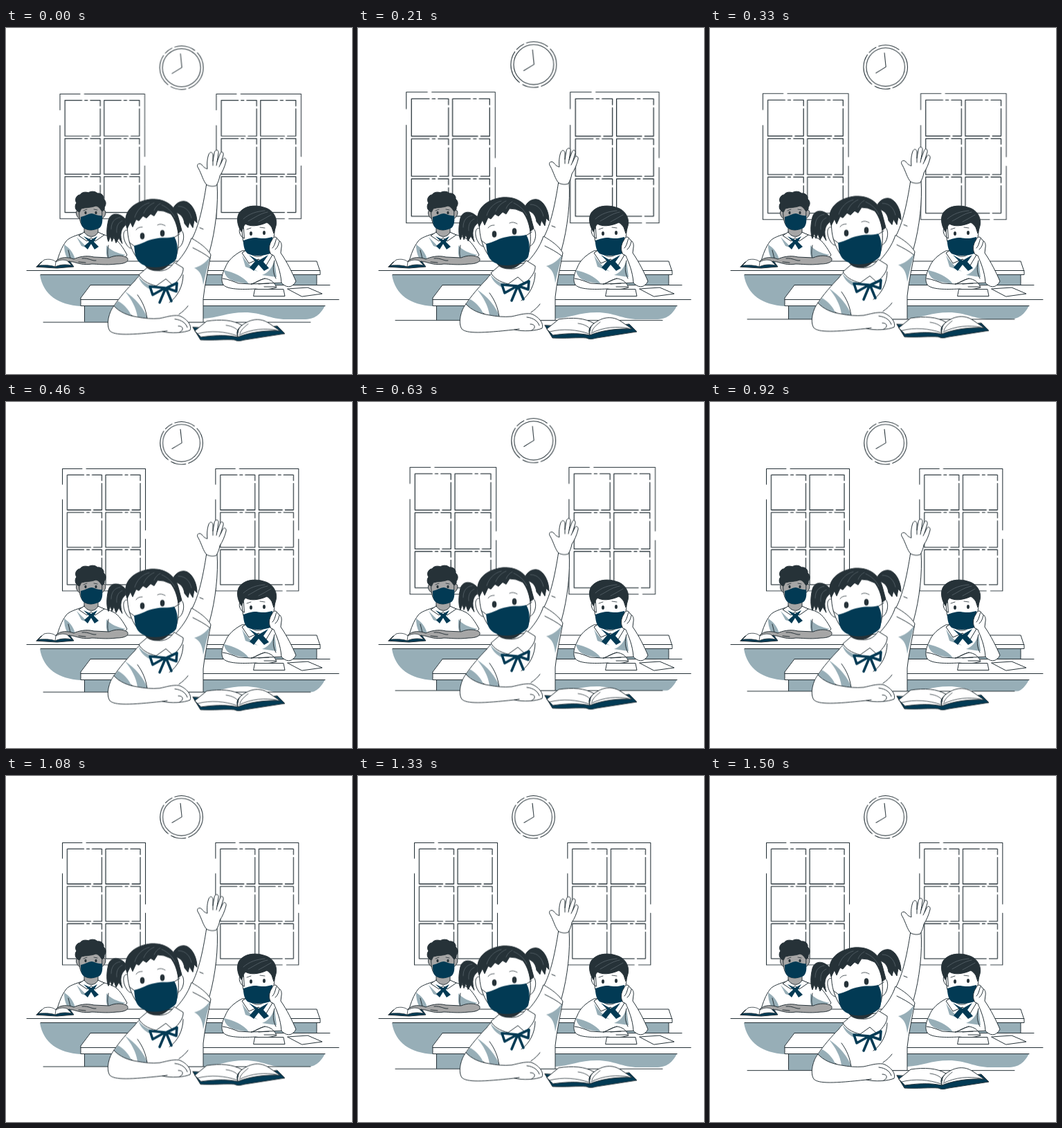
An HTML page for the animation above (1540 ms loop, 500 by 500 pixels).

```html
<!DOCTYPE html>
<html lang="en">
<head>
<meta charset="utf-8">
<title>Classroom</title>
<style>
  html, body { margin: 0; width: 100%; height: 100%; overflow: hidden; background: #fff; }
  svg { display: block; width: 100vw; height: 100vh; }
  .ink { fill: none; stroke: #263238; stroke-width: 1; stroke-linecap: round; stroke-linejoin: round; }
  .w { fill: #fff; }
  .hair { fill: #263238; }
  .navy { fill: #023a54; }
  .shade { fill: #97aeb7; stroke: none; }
  .skin { fill: #a6a6a6; }
  .flat { stroke: none; }
  .thin { stroke-width: .8; }
  .bold { stroke-width: 1.2; }
  .gloss { stroke: #76838a; stroke-width: .5; }
  .fold { stroke: #023a54; stroke-width: 3.6; }
  .room { transform-origin: 248px 150.5px; animation: beat 1540ms linear -31ms infinite; }
  .front { animation: float 1540ms linear -30ms infinite; }
  @keyframes beat {
    0%, 29.6%, 39.2%, 58.8%, 100% { transform: scale(1); }
    9.9%, 49% { transform: scale(1.1); }
  }
  @keyframes float {
    0%, 100% { transform: translateY(0); }
    50% { transform: translateY(-10px); }
  }
</style>
</head>
<body>
<svg viewBox="0 0 500 500" class="ink">
  <defs>
    <path id="pane" class="bold" d="M0 0H24M28 0H32M36 0H50V8M50 12V50.500H38M34 50.500H0V0"/>
    <g id="window">
      <path d="M81.500 119V96.500H110M116 96.500H201.500V185M201.500 198V273H184M178 273H81.500V141"/>
      <use href="#pane" x="88.500" y="105.500"/>
      <use href="#pane" x="144" y="105.500"/>
      <use href="#pane" x="88.500" y="159.500"/>
      <use href="#pane" x="144" y="159.500"/>
      <use href="#pane" x="88.500" y="213.500"/>
      <use href="#pane" x="144" y="213.500"/>
    </g>
  </defs>

  <g class="room">
    <use href="#window"/>
    <use href="#window" x="221.300"/>
    <circle cx="253.500" cy="59.300" r="27"/>
    <circle cx="253.500" cy="59.300" r="30.800" stroke-dasharray="38 4 22 5 46 4 12 4 30 5"/>
    <path d="M252 39.500L254 59L240 67.500"/>
  </g>

  <!-- back desk -->
  <g>
    <path class="w flat" d="M44 337H449L454 352V357H449V371H113V402H60V357L30 351Z"/>
    <path class="shade" d="M49 357H449V371H122L108 390V402C76 400 54 386 49 357Z"/>
    <path d="M150 337H449L454 352V356.500H50M30 350.500H454M449 357V371"/>
  </g>

  <!-- boy on the left -->
  <g>
    <path class="w" d="M113 296C100 300 91 303 87 308C80 317 77 327 74 336H168L175 328C169 317 163 308 156 304C149 300 140 299 133 296Z"/>
    <path class="shade" d="M84 313C91 317 98 325 100 335L88 332C85 326 84 320 84 313ZM145 314C150 321 162 326 173 328L149 334C144 331 145 324 145 314ZM102 302L118 318L109 315Z"/>
    <path d="M93 333L90 321M148 333C146 325 147 320 148 314"/>
    <path class="skin" d="M72 337C78 330 91 331 98 334C104 331 116 328 127 331L149 332C158 328 169 328 175 332C179 337 172 341 160 341C144 343 132 341 124 341C113 343 104 340 97 338Z"/>
    <path d="M110 333C120 332 124 337 130 336M105 338L115 339"/>
    <path class="skin" d="M113 288V297C118 304 127 304 133 297V286Z"/>
    <path class="w" d="M113 295L105 300L117 308L123 303L129 308L142 299L133 295C129 303 119 304 113 295Z"/>
    <path class="skin" d="M107 263C100 260 99 272 107 276ZM138 263C146 260 146 272 138 276Z"/>
    <path class="skin" d="M106 258C104 283 111 292 123 292C136 291 141 278 138 256Z"/>
    <path class="hair" d="M106 266C99 264 99 256 102 253C98 247 103 241 107 241C110 236 117 237 119 238C123 235 130 236 132 239C138 238 142 243 141 247C146 251 144 257 142 259C143 263 139 266 138 264C136 261 134 258 130 257C123 260 114 259 109 261Z"/>
    <path class="thin" d="M112 264L117 262M127 262L132 263"/>
    <g class="hair flat"><ellipse cx="115" cy="267" rx="1.600" ry="2.300"/><ellipse cx="130" cy="267" rx="1.600" ry="2.300"/></g>
    <path class="navy flat" d="M108 273C116 271 120 268 124 268C129 269 133 272 139 271C140 279 139 286 135 289C128 293 118 293 112 289C108 285 108 279 108 273Z"/>
    <path class="navy flat" d="M112 301L123 306L132 301L127 309L134 316L128 320L123 312L118 320L113 315L120 309Z"/>
    <path class="navy" d="M44 345L51 338L72 341L92 337L98 345L74 347Z"/>
    <path class="w thin" d="M47 343L55 335C63 333 69 335 72 338C79 334 84 335 88 336L95 343C85 341 78 342 71 345C62 342 55 343 47 343ZM72 338L71 345"/>
  </g>

  <!-- front desk -->
  <g>
    <path class="w flat" d="M122 371.500H468L481 392V401H108V390Z"/>
    <path class="shade" d="M113 401.500H461C454 414 447 421 430 421H405C382 421 370 411 345 411C320 411 305 419 285 420V427H113Z"/>
    <path d="M122 371.500H468M122 371.500L108 390V401.500H461M108 392.500H481M113.500 402V424"/>
  </g>

  <!-- boy on the right -->
  <g>
    <path class="w" d="M341 322C329 328 320 337 317 346C312 355 310 365 314 371C320 378 340 378 360 377C368 378 378 379 391 375C388 367 382 363 374 362C364 365 360 369 354 370L402 368C400 350 396 334 390 322Z"/>
    <path class="shade" d="M315 350C328 353 344 359 351 370L334 367C321 364 316 358 315 350ZM341 328C347 338 355 346 364 352L346 345ZM388 336C384 348 378 354 370 357L391 360Z"/>
    <path d="M313 362C322 363 330 367 336 369L354 370C360 369 365 364 374 362M388 336C385 346 386 354 390 362M365 370L380 369M373 374L390 374"/>
    <path class="w" d="M350 319V329C357 337 368 337 377 328V318Z"/>
    <path class="w" d="M349 320L341 325L351 340L365 334L376 343L385 328L377 321C372 333 356 334 349 320Z"/>
    <path class="w" d="M343 288C335 285 335 300 344 304ZM342 280C339 306 344 326 364 327C383 326 390 306 388 279Z"/>
    <path class="hair" d="M340 294C333 284 332 269 341 263C349 256 363 256 372 259C386 262 393 275 390 286L387 297L384 288C382 285 380 283 377 281C364 287 352 287 346 283C343 286 343 290 340 294Z"/>
    <path class="gloss" d="M343 276C352 268 362 265 374 264M350 279C360 274 367 268 378 266M365 280C373 276 379 272 383 270"/>
    <path class="thin" d="M348 291L354 289M367 288L374 289"/>
    <g class="hair flat"><ellipse cx="354" cy="297" rx="2" ry="3"/><ellipse cx="373" cy="296" rx="2" ry="3"/></g>
    <path class="navy flat" d="M343 307C350 305 354 303 362 303C371 305 377 304 385 302C387 310 386 320 382 326C370 330 357 330 349 326C344 321 343 314 343 307Z"/>
    <path class="w" d="M383 327C379 321 380 313 384 307C387 300 391 301 393 306C397 308 399 312 398 317L397 325C406 338 414 354 419 366C413 377 404 375 398 368C397 352 391 338 387 329Z"/>
    <path d="M385 318C389 314 389 308 391 304M389 320C393 317 394 312 395 308"/>
    <path class="navy flat" d="M351 328L365 336L379 328L372 338L380 347L373 351L365 342L358 351L352 346L360 337Z"/>
    <path class="w" d="M360 377.500H401L403 387.500H358ZM407 377L436 375L457 384L428 388Z"/>
  </g>

  <g class="front">
    <path class="w flat" d="M54 425.600H482V445H54Z"/>
    <path d="M54 425.600H440"/>

    <!-- raised arm -->
    <path class="w" d="M266 310C277 292 284 264 290 224L305 226C307 254 303 292 294 324Z"/>
    <path class="w" d="M290 227C285 222 283 212 278 203C274 198 279 194 283 198C286 202 288 203 291 204C290 196 291 188 293 183C295 178 299 180 299 184L299 193L301 181C302 175 308 176 307 181L305 194L309 183C311 177 315 180 314 184L310 197L313 191C315 186 319 189 318 193C316 201 313 208 309 214C308 220 306 224 304 228C299 230 294 229 290 227Z"/>
    <path d="M299 193L299 199M305 194L304 199M310 197L308 201M280 289L285 291"/>

    <!-- shirt -->
    <path class="w" d="M207 348C196 355 190 360 186 366C176 376 163 391 156 402L200 425.600H285V392C287 372 292 350 296 328C290 318 280 311 268 304C263 320 252 334 244 342Z"/>
    <path class="shade" d="M295 331C287 341 280 345 272 347C280 351 284 358 285 372C288 357 292 343 295 331ZM172 381C187 391 199 405 205 421L190 418C188 404 181 392 172 381ZM162 395C171 400 178 408 181 416C171 413 163 409 156 402ZM191 359C198 368 207 373 218 374L206 377C198 372 194 367 191 359Z"/>
    <path d="M190 386C198 397 202 407 204 420M256 357C256 373 248 389 236 397M270 318C278 322 288 327 295 333M250 414C255 411 260 406 263 402"/>
    <path class="w" d="M206 345L192 357C196 364 204 370 217 373L231 363L241 372C251 364 257 354 256 347L243 339C235 353 218 355 206 345Z"/>
    <path class="hair flat" d="M198 338C202 354 226 357 238 340Z"/>

    <!-- bow -->
    <path class="fold" d="M230 376L208 374L212 386ZM232 376L247 369L246 381ZM230 378L222 397M232 378L239 395"/>

    <!-- head -->
    <path class="hair" d="M173 277C166 268 152 265 148 278C145 290 145 302 148 309L151 301L153 309L156 302L159 311L163 304L168 312C164 299 166 291 172 286Z"/>
    <path class="hair" d="M242 260C247 251 256 249 262 252C271 257 276 270 276 282L272 278L270 289L265 281L263 289L258 283C257 274 252 268 245 267Z"/>
    <path class="gloss" d="M152 291C152 281 157 275 165 274M160 296C159 286 163 281 168 279M249 258C260 258 266 266 268 275"/>
    <path class="w" d="M177 293C168 289 168 304 174 313C177 318 181 320 184 318ZM248 293C257 288 259 304 254 313C251 318 248 319 245 318Z"/>
    <path class="w" d="M176 280C174 298 178 314 186 328C196 345 235 348 246 330C251 315 250 296 245 272L220 256Z"/>
    <path class="hair" d="M175 290C167 270 180 252 208 248C232 246 246 259 250 278L254 293L249 297C247 284 243 275 238 269L228 265L219 264L214 272L209 269L203 275L198 272L192 279L188 277L183 288L180 281Z"/>
    <path class="gloss" d="M186 274C189 264 196 256 207 253M199 268C202 261 207 256 214 253M214 264C216 259 219 256 223 254M225 256C234 260 240 266 244 274"/>
    <path class="thin" d="M188 292C190 289 193 288 197 288M219 285C223 283 226 284 230 286"/>
    <g class="hair flat"><ellipse cx="197" cy="301" rx="3.300" ry="4.700"/><ellipse cx="226" cy="297" rx="3.300" ry="4.700"/></g>
    <path d="M243 303L251 298M186 316L178 310"/>
    <path class="navy flat" d="M185 315C196 313 205 306 215 305C225 302 234 305 243 302C248 309 249 322 246 334C241 343 224 347 210 346C200 345 192 340 189 334C186 328 186 322 185 315Z"/>

    <!-- resting arm -->
    <path class="w" d="M156 402C149 410 144 429 150 438C157 445 180 444 226 439C238 442 257 441 266 437C269 430 261 420 250 416C240 415 232 418 222 420C211 421 200 420 190 418C176 416 164 411 156 402Z"/>
    <path d="M244 421C254 422 260 427 262 433M251 440C257 437 257 431 249 431M226 439L233 438"/>

    <!-- book -->
    <path class="navy" d="M270 433L281 451C300 452 318 450 330 451C336 454 340 452 345 451L403 442L392 431L340 436Z"/>
    <path class="w" d="M273 438L290 424C310 421 328 422 341 430C333 436 333 441 335 447C316 443 296 445 282 447Z"/>
    <path class="w" d="M341 430C354 420 368 419 380 427L396 438C375 437 352 440 335 447C334 440 336 434 341 430Z"/>
    <path class="thin" d="M277 442C296 437 317 439 334 445M337 444C355 435 375 434 391 437M318 430C327 431 335 435 336 440M350 428C345 432 339 437 338 442"/>
  </g>
</svg>
</body>
</html>
```
